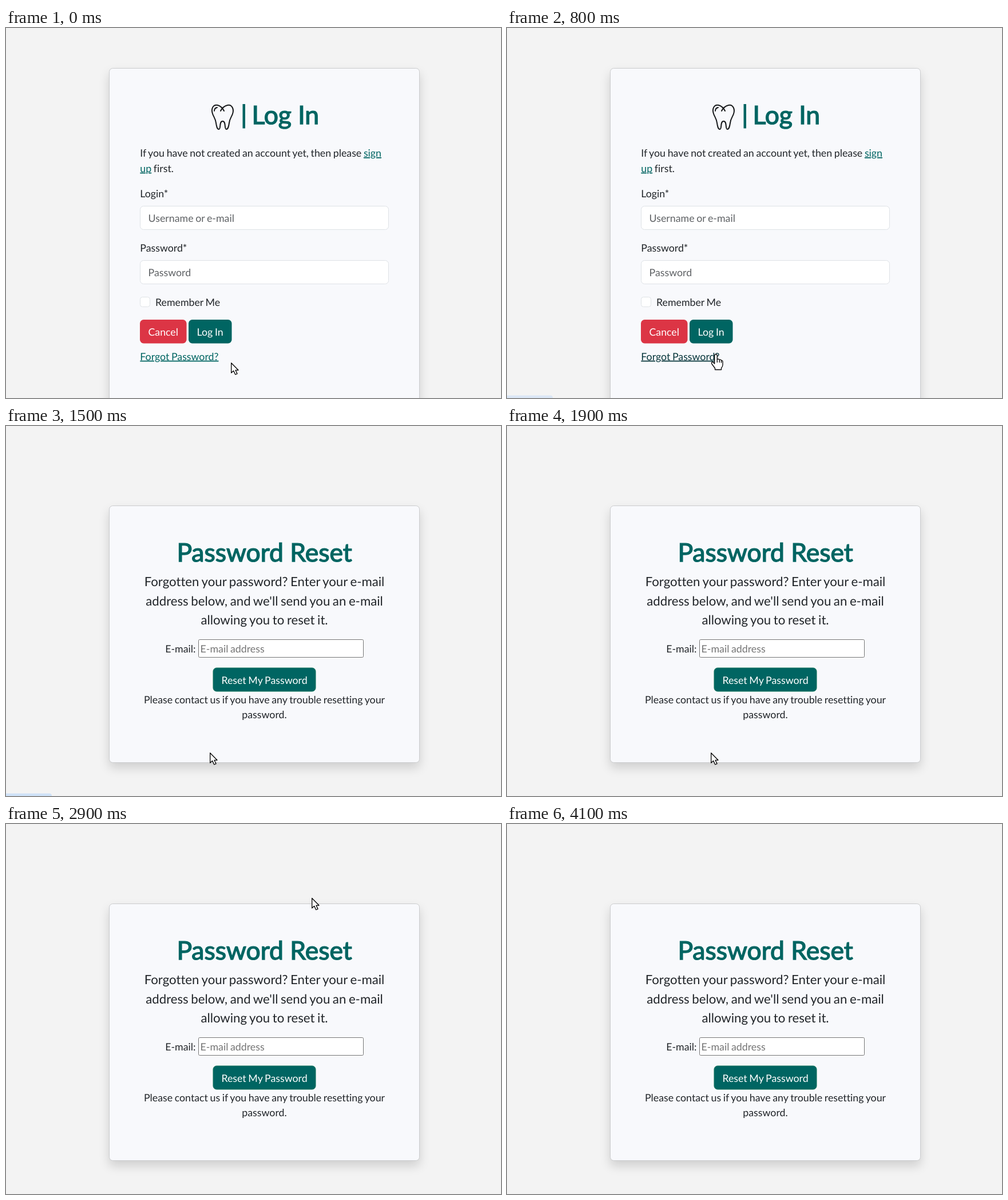
An HTML page that plays this animation: 865x647 px, repeating every 4.3 s.

```html
<!DOCTYPE html>
<html lang="en">
<head>
<meta charset="utf-8">
<title>Password reset</title>
<style>
  html, body { margin: 0; width: 100%; height: 100%; overflow: hidden; background: #f3f3f3; }
  svg { position: absolute; left: 0; top: 0; }
  .card {
    position: absolute; left: 180px; width: 543px; box-sizing: border-box;
    background: #f8f9fc; border: 1px solid #cbccce; border-radius: 6.67px;
    box-shadow: 0 8.9px 17.8px rgba(0, 0, 0, .15);
  }
  #login .card { top: 70px; height: 640px; }
  #reset .card { top: 139px; height: 450px; }
  text {
    font: 17.78px Lato, sans-serif; font-variant-ligatures: none; word-spacing: -.05em;
    fill: #212529; text-rendering: geometricPrecision;
  }
  .title { font-size: 44.44px; word-spacing: 0; fill: #006562; stroke: #006562; stroke-width: 1.4; }
  .lead { font-size: 22.22px; }
  .middle { text-anchor: middle; }
  .hint { fill: #5f6265; }
  .light { fill: #fff; }
  .link { fill: #006562; text-decoration: underline; }
  .link.hover { fill: #08373c; }
  .field { fill: #fff; stroke: #dee2e6; }
  .teal { fill: #006562; }
  .tooth { fill: none; stroke: #17191b; stroke-width: 2; stroke-linecap: round; stroke-linejoin: round; }
  #cursor path { fill: #fff; stroke: #000; stroke-width: 1.3; stroke-linejoin: round; }
  #cursor #beam { fill: none; stroke: #222; }
</style>
</head>
<body>
<section id="login">
  <div class="card"></div>
  <svg width="865" height="647">
    <g class="tooth">
      <path d="M381 145Q377 137 370 135C362 133 358 141 361 150C363 156 366 158 367 166C368 173 369 177 372 177C376 177 372 163 378.500 163C385 163 381 177 385 177C388 177 389 173 390 166C391 158 394 156 396 150C399 141 394 133 387 135Q379 137 375 145"/>
      <path d="M364 145Q364 140 369 139"/>
    </g>
    <rect class="teal" x="413.500" y="133" width="4.500" height="42.500"/>
    <text class="title" x="429.500" y="168.300">Log In</text>
    <text x="234.300" y="225">If you have not created an account yet, then please <tspan class="link">sign</tspan></text>
    <text x="234.300" y="251.700"><tspan class="link">up</tspan> first.</text>
    <text x="234.300" y="296">Login*</text>
    <rect class="field" x="234.500" y="311.500" width="434" height="41" rx="6"/>
    <text class="hint" x="248.600" y="339.300">Username or e-mail</text>
    <text x="234.300" y="391">Password*</text>
    <rect class="field" x="234.500" y="406.500" width="434" height="41" rx="6"/>
    <text class="hint" x="248.600" y="434.200">Password</text>
    <rect class="field" x="234.500" y="470.500" width="17" height="17" rx="4"/>
    <text x="261" y="486">Remember Me</text>
    <rect x="234" y="510" width="81.500" height="41.500" rx="6.500" fill="#dc3545"/>
    <text class="light middle" x="274.700" y="538">Cancel</text>
    <rect class="teal" x="319" y="510" width="75.500" height="41.500" rx="6.500"/>
    <text class="light middle" x="356.700" y="538">Log In</text>
    <text class="link" id="forgot" x="234.300" y="580.600">Forgot Password?</text>
  </svg>
</section>

<section id="reset">
  <div class="card"></div>
  <svg width="865" height="647">
    <text class="title middle" x="451.500" y="236.500">Password Reset</text>
    <g class="middle">
      <text class="lead" x="451.500" y="280.300">Forgotten your password? Enter your e-mail</text>
      <text class="lead" x="451.500" y="313.600">address below, and we'll send you an e-mail</text>
      <text class="lead" x="451.500" y="346.900">allowing you to reset it.</text>
    </g>
    <text x="278.200" y="396">E-mail:</text>
    <rect x="336.500" y="373.500" width="288" height="31" rx="2" fill="#fff" stroke="#767676"/>
    <text x="339.600" y="396" style="fill:#757575">E-mail address</text>
    <rect class="teal" x="362" y="423" width="179" height="41" rx="6" stroke="#12755c"/>
    <g class="middle">
      <text class="light" x="451.500" y="450.900">Reset My Password</text>
      <text x="451.500" y="484.700">Please contact us if you have any trouble resetting your</text>
      <text x="451.500" y="511.400">password.</text>
    </g>
  </svg>
</section>

<svg width="865" height="647">
  <path id="status" d="M0 642.500H76Q80 642.500 80 647H0Z" fill="#cfe2f8"/>
  <g id="cursor">
    <path id="arrow" d="M.7 .7V18L4.600 14.400L7.800 21L11 19.600L8 13.300H13Z"/>
    <g id="hand">
      <path d="M-2.300 3Q-2.300 .7 0 .7T2.300 3V9.500Q4.500 7.800 6.200 10.300Q8.500 9 9.700 11.500Q12 11 12 14V19Q12 22 9.500 24.500V27.500H-1.500V25L-7 17.500Q-8.500 14.500-6 14Q-4.500 14-2.300 17Z"/>
      <path d="M2.300 9.500V15M6.200 10.500V15M9.500 12V15.500"/>
    </g>
    <path id="beam" d="M-3-7H-1L0-6L1-7H3M0-6V6M-3 7H-1L0 6L1 7H3"/>
  </g>
</svg>

<script>
  const LOOP = 4300, STEP = 100, PAGE_CHANGE = 1500;
  const byId = id => document.getElementById(id);
  const clamp = v => Math.max(0, Math.min(1, v));
  const easeOut = p => 1 - (1 - p) ** 2;
  const show = (id, visible) => byId(id).style.display = visible ? "" : "none";

  // The pointer glides to a stop when `glide` is set, otherwise it jumps there.
  const stops = [
    { t: 0, x: 393, y: 585 },
    { t: 600, x: 365, y: 570, glide: true },
    { t: 1500, x: 356, y: 571 },
    { t: 2300, x: 431, y: 295 },
    { t: 2600, x: 534, y: 129, glide: true },
    { t: 3400, x: 526, y: 71 },
    { t: 3600, x: 514, y: -26, glide: true }
  ];

  function pointerAt(t) {
    const i = stops.findLastIndex(s => s.t <= t);
    const from = stops[i], to = stops[i + 1];
    if (!to || !to.glide) return from;
    const p = easeOut((t - from.t) / (to.t - from.t));
    return { x: from.x + (to.x - from.x) * p, y: from.y + (to.y - from.y) * p };
  }

  const inside = ({ x, y }, left, top, right, bottom) =>
    x >= left && x <= right && y >= top && y <= bottom;

  function draw(t) {
    const onLogin = t < PAGE_CHANGE;
    const pointer = pointerAt(t);
    const overLink = onLogin && inside(pointer, 234, 564, 373, 586);
    const overText = !onLogin && inside(pointer, 239, 195, 663, 350);

    show("login", onLogin);
    show("reset", !onLogin);
    show("hand", overLink);
    show("beam", overText);
    show("arrow", !overLink && !overText);
    byId("forgot").classList.toggle("hover", overLink);
    byId("cursor").setAttribute("transform",
      `translate(${Math.round(pointer.x)} ${Math.round(pointer.y)})`);
    byId("status").style.opacity = clamp((t - 600) / 300) * clamp((1900 - t) / 300);
  }

  function tick() {
    const t = performance.now() % LOOP;
    draw(Math.floor(t / STEP) * STEP);
    requestAnimationFrame(tick);
  }
  tick();
</script>
</body>
</html>
```
